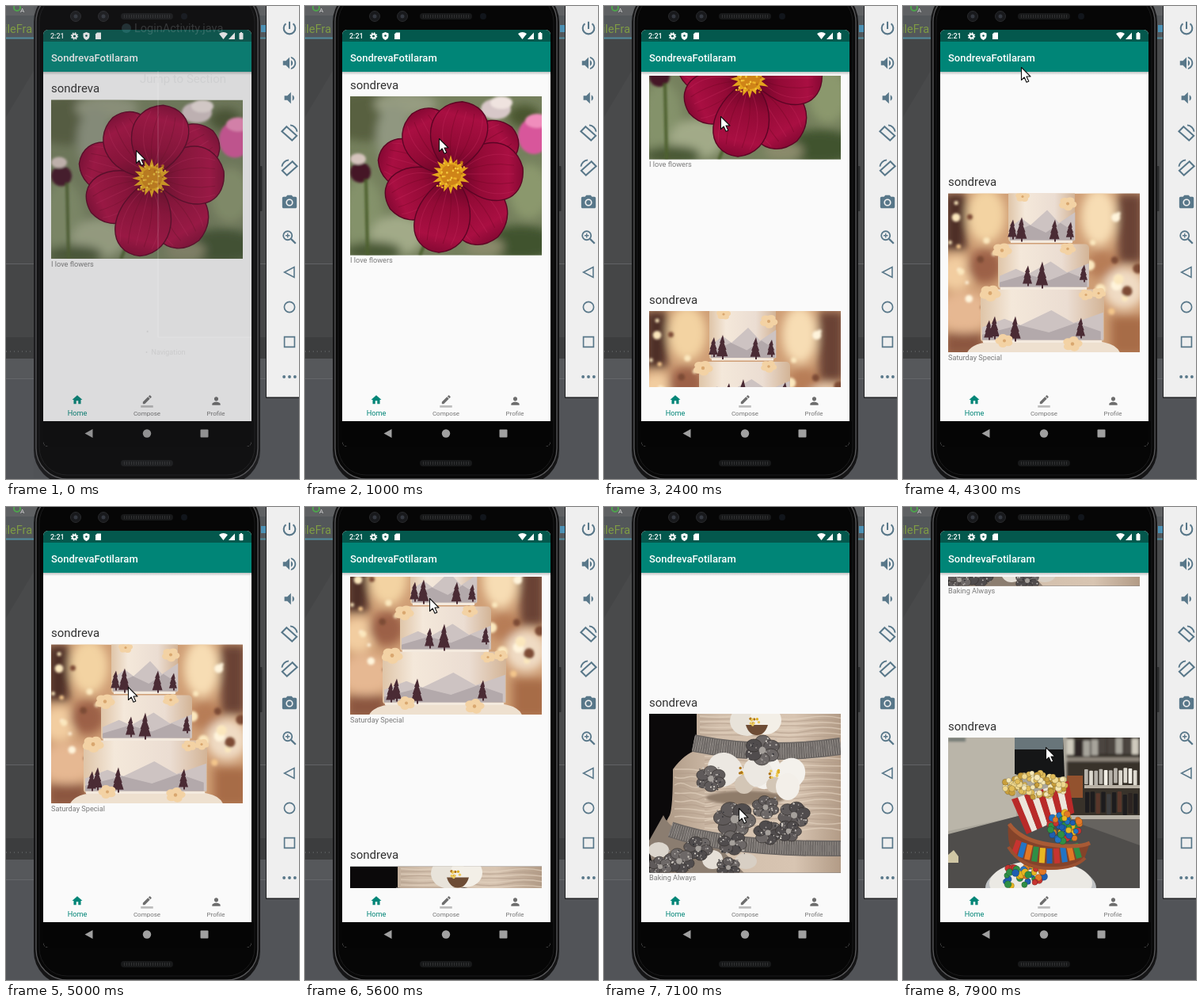
An HTML page for the animation above (8 s loop, 370 px wide and 597 px high).

```html
<!DOCTYPE html>
<html lang="en">
<head>
<meta charset="utf-8">
<title>Photo feed</title>
<style>
html, body { margin: 0; width: 100%; height: 100%; overflow: hidden; background: #515357; }
svg { display: block; }
text { font-family: Roboto, Arial, sans-serif; white-space: pre; }
</style>
</head>
<body>
<svg id="stage" width="370" height="597" viewBox="0 0 370 597"></svg>
<script>
const LOOP = 8000, STEP = 100, PITCH = 392;

let seed = 7;
const rnd = (a = 0, b = 1) => a + (b - a) * ((seed = seed * 16807 % 2147483647) / 2147483647);
const pick = list => list[Math.floor(rnd(0, list.length))];
const times = (n, fn) => Array.from({ length: n }, (_, i) => fn(i)).join('');

const rect = (x, y, w, h, fill, more = '') => `<rect x="${x}" y="${y}" width="${w}" height="${h}" fill="${fill}" ${more}/>`;
const oval = (x, y, rx, ry, fill, more = '') => `<ellipse cx="${x}" cy="${y}" rx="${rx}" ry="${ry}" fill="${fill}" ${more}/>`;
const dot = (x, y, r, fill, more) => oval(x, y, r, r, fill, more);
const path = (d, fill, more = '') => `<path d="${d}" fill="${fill}" ${more}/>`;
const line = (d, color, width, more = '') => path(d, 'none', `stroke="${color}" stroke-width="${width}" ${more}`);
const text = (x, y, size, fill, str, more = '') => `<text x="${x}" y="${y}" font-size="${size}" fill="${fill}" ${more}>${str}</text>`;
const group = (more, body) => `<g ${more}>${body}</g>`;
const blur = (n, body) => group(`filter="url(#blur${n})"`, body);
// 24-unit icon centred on a point
const icon = (x, y, size, color, body) =>
  group(`transform="translate(${x - size / 2} ${y - size / 2}) scale(${size / 24})" fill="${color}" color="${color}"`, body);
const glyph = d => `<path d="${d}"/>`;
const outline = (d, w = 2) => line(d, 'currentColor', w);

// ---------- photos, 242 x 200.5 ----------
function flower() {
  const petals = [[195, 93, 58], [-33, 97, 60], [155, 88, 62], [58, 99, 70], [0, 91, 68], [-118, 90, 62], [-76, 92, 66], [103, 100, 64]];
  const petal = ([angle, len, w]) => group(`transform="translate(127 98) rotate(${angle})"`,
    path(`M0 0C${len * .25} ${-w * .7} ${len * .85} ${-w * .8} ${len} ${-w * .12}C${len * 1.05} ${w * .55} ${len * .5} ${w * .78} 0 0Z`,
      'url(#petal)', 'stroke="#5c0424" stroke-width="1.4"') +
    times(5, i => line(`M16 ${(i - 2) * 3}Q${len * .5} ${(i - 2) * w * .24} ${len * .88} ${(i - 2) * w * .16}`, i % 2 ? '#6b0522' : '#c1285b', 1, 'opacity=".4"')));
  const rays = times(32, i => {
    const a = i * Math.PI / 16, r = i % 2 ? 15 : rnd(20, 26);
    return `${i ? 'L' : 'M'}${127 + r * Math.cos(a)} ${99 + r * Math.sin(a)}`;
  }) + 'Z';
  return rect(0, 0, 242, 201, '#75805d') +
    blur(6, oval(20, 25, 50, 32, '#59613f') + oval(70, 10, 40, 15, '#969c81') + oval(16, 150, 26, 48, '#84926a') +
      oval(60, 175, 34, 25, '#a2aa88') + oval(55, 50, 22, 40, '#909780') + oval(226, 120, 25, 35, '#8b986d') +
      oval(215, 185, 48, 22, '#40522d') + oval(30, 195, 35, 12, '#495835') + oval(220, 25, 20, 14, '#48552f') + oval(170, 190, 25, 12, '#8b8b6c')) +
    blur(2, oval(232, 50, 20, 23, '#d8579b') + oval(236, 31, 15, 9, '#f08dbc') + oval(184, 16, 19, 13, '#d7c7c8') + oval(191, 8, 14, 8, '#efe3df') +
      oval(13, 96, 13, 13, '#451725') + oval(10, 79, 10, 7, '#d5c4bd') + line('M20 105L22 201M110 150L88 201', '#4d602f', 4)) +
    petals.map(petal).join('') +
    path(rays, '#e3a51d') + dot(127, 99, 13, '#cf8418') +
    times(45, () => dot(127 + rnd(-17, 17), 99 + rnd(-17, 17), 1.3, pick(['#f5ca3d', '#f0b62b', '#bd6c13'])));
}

const blossom = (x, y, r, color, heart) => times(5, i =>
  oval(x + r * .6 * Math.cos(i * 1.257 + x), y + r * .45 * Math.sin(i * 1.257 + x), r * .55, r * .42, color)) + dot(x, y, r * .2, heart);

function weddingCake() {
  const tree = (x, y, h) => path(`M${x} ${y - h}l${h * .08} ${h * .33}h-1l${h * .1} ${h * .28}h-1l${h * .09} ${h * .27}h${-h * .46}l${h * .09} ${-h * .27}h-1l${h * .1} ${-h * .28}h-1Z`, '#4a2b34') +
    rect(x - 1, y - h * .14, 2, h * .14, '#4a2b34');
  const tier = (x, y, w, h) => rect(x, y, w, h, 'url(#icing)', 'rx="5"') +
    path(`M${x + 2} ${y + h - 3}v${-h * .24}l${w * .18} ${-h * .16} ${w * .13} ${h * .12} ${w * .25} ${-h * .28} ${w * .18} ${h * .24} ${w * .24} ${-h * .2}V${y + h - 3}Z`, '#cdc3c2') +
    path(`M${x + 2} ${y + h - 3}v${-h * .1}l${w * .3} ${-h * .18} ${w * .24} ${h * .14} ${w * .22} ${-h * .18} ${w * .2} ${h * .16}V${y + h - 3}Z`, '#b3a9ab') +
    line(`M${x + 3} ${y + h - 1}h${w - 6}`, '#f4eade', 3);
  return rect(0, 0, 242, 201, '#cf9e75') +
    blur(6, rect(-5, 0, 28, 72, '#4d2f28') + oval(48, 28, 24, 34, '#f3d3a2') + oval(10, 100, 22, 22, '#f2cda0') + oval(46, 92, 22, 22, '#9c6047') +
      oval(20, 150, 32, 26, '#e6b892') + oval(190, 30, 22, 36, '#f7ddb4') + rect(214, 0, 32, 88, '#6a4334') +
      oval(195, 90, 20, 18, '#b77d57') + oval(222, 120, 26, 26, '#f0dcc4') + rect(205, 155, 45, 50, '#a76c47') + rect(-5, 176, 50, 30, '#8c5640')) +
    blur(2, times(26, i => dot(i % 2 ? rnd(2, 62) : rnd(178, 240), rnd(0, 150), rnd(2, 7), pick(['#fbe7bd', '#fff4dc', '#f3c58b', '#7d4b36'])))) +
    path('M24 201Q30 188 60 187H190Q212 189 217 201Z', '#eee0cf') + tier(41, 121, 156, 67) + tier(63, 64, 115, 57) + tier(76, -6, 84, 68) +
    [[82, 58, 25], [93, 61, 31], [135, 61, 28], [155, 58, 22], [101, 117, 26], [119, 120, 34], [172, 112, 22], [52, 185, 25], [59, 184, 29], [85, 187, 32], [168, 183, 26]].map(t => tree(...t)).join('') +
    [[94, 4, 8], [151, 13, 10], [68, 72, 11], [151, 70, 9], [53, 126, 12], [174, 128, 8], [190, 126, 8], [71, 186, 10], [157, 190, 11]].map(([x, y, r]) => blossom(x, y, r, '#f3d2a4', '#d9a76f')).join('');
}

function orchidCake() {
  const brooch = (x, y, r) => times(6, i => {
    const a = i * Math.PI / 3 + x;
    return oval(x + r * .58 * Math.cos(a), y + r * .5 * Math.sin(a), r * .45, r * .36, pick(['#5f5a5a', '#6d6867', '#504c4d']), 'stroke="#35312f" stroke-width=".7"');
  }) + times(34, () => dot(x + rnd(-r, r) * .85, y + rnd(-r, r) * .75, rnd(.5, 1.2), pick(['#b5b0ad', '#37363a', '#8b8582', '#d5d0c8']))) + dot(x, y, r * .2, '#a5a09b');
  const heart = (x, y) => times(10, () => dot(x + rnd(-6, 6), y + rnd(-5, 5), 1.7, pick(['#dfaf21', '#ad7319', '#ecc95a'])));
  const orchid = (x, y, r) => path(`M${x} ${y}C${x - r * .3} ${y - r} ${x - r * 1.4} ${y - r * .6} ${x - r * 1.1} ${y + r * .1}Q${x - r * .7} ${y + r * .9} ${x} ${y}Z`, '#ece8e2') +
    path(`M${x} ${y}C${x + r * .3} ${y - r} ${x + r * 1.4} ${y - r * .6} ${x + r * 1.1} ${y + r * .2}Q${x + r * .6} ${y + r} ${x} ${y}Z`, '#f4f1ec') +
    oval(x, y + r * .4, r * .3, r * .3, '#d3c6b6') + heart(x, y);
  const ribbon = (d, w) => line(d, '#6a6562', w) + line(d, '#98928d', w - 3, 'stroke-dasharray="1 2"') + line(d, '#7a7572', w * .4, 'stroke-dasharray="1 1.5"');
  const swirls = (x, y, w, n, gap) => times(n, i => line(`M${x} ${y + i * gap}q${w * .12} ${rnd(-7, 3)} ${w * .25} 0t${w * .25} 2 ${w * .25} 0 ${w * .25} 1`, i % 2 ? '#b39d8a' : '#e6d5c3', 1.4, 'opacity=".6"'));
  return rect(0, 0, 242, 201, '#0b090a') +
    path('M60 0H242V201H8Q12 150 26 128Q30 118 30 70Q45 50 60 46Z', 'url(#cream)') +
    swirls(64, 3, 180, 8, 3.4) + swirls(70, 54, 172, 21, 4.5) + swirls(32, 70, 65, 14, 5) +
    path('M18 128Q26 150 90 170L120 201H12Q0 190 0 160Z', '#8b7d70') + blur(2, oval(122, 106, 50, 9, '#8f7c6a')) +
    ribbon('M56 37Q145 55 242 41', 22) + ribbon('M27 146Q100 171 242 170', 20) +
    oval(124, 9, 22, 19, '#e8e3da') + oval(147, 8, 20, 18, '#f3efe7') + path('M122 14H150Q146 27 136 27T122 14Z', '#6d4c35') + heart(134, 10) +
    orchid(120, 73, 40) + orchid(158, 76, 34) + oval(175, 92, 15, 17, '#f3efe9') +
    oval(12, 172, 13, 10, '#dcd6cd') + oval(80, 184, 13, 12, '#e5dfd7') + oval(122, 186, 14, 10, '#d8cfc4') +
    [[78, 82, 19], [143, 46, 22], [108, 133, 26], [147, 118, 17], [183, 128, 20], [150, 150, 18], [105, 163, 18], [176, 148, 16], [62, 170, 18], [38, 186, 19], [14, 193, 15], [100, 194, 15]].map(b => brooch(...b)).join('');
}

function popcornCake() {
  const candy = ['#c73430', '#1f5fb0', '#e8b622', '#2f8f45', '#e27825', '#2374c4'];
  const balls = (n, x, y, w, h, colors, r) => times(n, () => {
    const a = rnd(0, 6.283), k = Math.sqrt(rnd());
    return dot(x + w * k * Math.cos(a), y + h * k * Math.sin(a), r * rnd(.8, 1.2), pick(colors), 'stroke="#0004" stroke-width=".7"');
  });
  const bottles = (x, y, w, h, n, colors) => times(n, i => rect(x + i * w / n, y + rnd(0, 4), w / n - 1.5, h, pick(colors), 'rx="1"'));
  const side = i => [80 + i * 8, 78 - i * 2.6, 99 + i * 6.7, 122 - i * 3];
  const stripe = i => {
    const [a, b, c, d] = side(i), [e, f, g, h] = side(i + 1);
    return path(`M${a} ${b}L${e} ${f}L${g} ${h}L${c} ${d}Z`, i % 2 ? '#ede5db' : '#b92a29');
  };
  return rect(0, 0, 242, 201, '#aaa69b') + path('M0 0H86V100L0 118Z', '#bab5a9') +
    blur(2, rect(0, 0, 22, 5, '#747a76') + rect(150, -3, 95, 105, '#37302c') +
      bottles(150, 0, 92, 20, 9, ['#cfcabd', '#a7a49b', '#4b4540', '#2d2826']) + rect(150, 25, 92, 5, '#8d857a')) +
    bottles(172, 38, 68, 19, 11, ['#f1eee5', '#dedad0', '#b7b3ab']) + rect(150, 48, 20, 28, '#93522e') + rect(172, 60, 70, 4, '#b8b1a5') +
    bottles(173, 68, 68, 26, 10, ['#1d1c1e', '#2c2422', '#59372b', '#3d3e40']) + rect(148, 98, 94, 5, '#b9b4a9') +
    path('M0 122L92 98 150 103H242V201H0Z', '#4f4d4b') + path('M150 103H242V136Z', '#66635f') +
    path('M0 148l7 -6 6 8v8H0Z', '#d0c7a5') +
    oval(117, 190, 70, 32, '#bfc2c4') + oval(117, 184, 65, 29, '#ebe9e4') +
    path('M84 0H145L147 49Q118 56 84 46Z', '#151617') + rect(84, 0, 61, 15, '#68757a') +
    times(9, stripe) +
    balls(95, 110, 60, 40, 16, ['#f0d98f', '#f6e8b5', '#c99f3c', '#e0bb58'], 3.6) +
    balls(42, 93, 174, 29, 15, candy, 4) +
    path('M76 108Q92 130 128 135T179 133L172 153Q142 174 102 163Q72 152 76 108Z', '#84432a') +
    times(10, i => rect(82 + i * 8.5, 129 + 11 * Math.sin(i * .3), 7, 19, candy[i * 5 % 6], `transform="rotate(${20 - i * 4} ${85 + i * 8.5} 140)"`)) +
    line('M77 109Q92 130 128 135T179 133', '#a85a35', 5) + line('M76 138Q92 164 126 165T173 152', '#9a5030', 4) +
    balls(65, 147, 113, 20, 18, candy, 4);
}

// ---------- screen ----------
const posts = [['I love flowers', flower], ['Saturday Special', weddingCake], ['Baking Always', orchidCake], ['', popcornCake]];
const feed = posts.map(([caption, photo], i) => group(`transform="translate(57 ${i * PITCH})"`,
  text(0, 109, 15, '#303030', 'sondreva') +
  `<svg y="118.5" width="242" height="200.5">${photo()}</svg>` +
  text(0, 328.6, 9.2, '#7b7b7b', caption))).join('');

const HOME = 'M10 20v-6h4v6h5v-8h3L12 3 2 12h3v8z';
const PEN = 'M17.75 7L14 3.25l-10 10V17h3.75l10-10zm2.96-2.96c.39-.39.39-1.02 0-1.41L18.37.29c-.39-.39-1.02-.39-1.41 0L15 2.25 18.75 6l1.96-1.96z';
const PERSON = 'M12 12c2.21 0 4-1.79 4-4s-1.79-4-4-4-4 1.79-4 4 1.79 4 4 4zm0 2c-2.67 0-8 1.34-8 4v2h16v-2c0-2.66-5.33-4-8-4z';
const middle = 'text-anchor="middle"';

const screen = rect(47, 30, 263, 526, '#fafafa') +
  group('clip-path="url(#list)"', `<g id="feed">${feed}</g>`) +
  rect(47, 83, 263, 4, 'url(#shade)') +
  rect(47, 30, 263, 16, '#04584d') + rect(47, 45, 263, 38, '#008577') +
  text(57, 70, 13, '#fff', 'SondrevaFotilaram', 'font-weight="500"') +
  text(56, 41, 9, '#fff', '2:21', 'font-weight="500"') +
  dot(86.5, 38, 2.6, 'none', 'stroke="#fff" stroke-width="2"') + dot(86.5, 38, 4, 'none', 'stroke="#fff" stroke-width="1.4" stroke-dasharray="1.6 1.54"') +
  path('M101.5 33l4 1.5v3q0 4-4 5.5-4-1.5-4-5.5v-3Z', '#fff') + dot(101.5, 37.5, 1.3, '#04584d') +
  path('M115 33.5h5v8.5h-7v-6.5Z', '#fff') +
  path('M269 35q5.5-4 11 0l-5.5 7Z', '#fff') + path('M289 33.5V42h-8Z', '#fff') + rect(294.5, 34, 5, 8.2, '#fff', 'rx=".8"') + rect(296, 33, 2, 2, '#fff') +
  rect(47, 481, 263, 43, '#fafafa') +
  icon(90, 497, 15.5, '#008577', glyph(HOME)) +
  icon(178, 499, 15.5, '#6d6d6d', glyph(PEN) + rect(0, 20, 24, 4, '#b9b9b9')) +
  icon(265.5, 498.5, 15.5, '#6d6d6d', glyph(PERSON)) +
  text(90, 516.5, 9.2, '#008577', 'Home', middle) + text(178, 516.5, 8, '#757575', 'Compose', middle) + text(265, 516.5, 8, '#757575', 'Profile', middle) +
  rect(47, 524, 263, 32, '#050505') +
  path('M99.5 539.5l10-5.5v11Z', '#a0a0a0') + dot(178, 539.5, 5.2, '#a0a0a0') + rect(245.5, 534.5, 10, 10, '#a0a0a0', 'rx="1"');

// ---------- surroundings ----------
const desktop = rect(0, 0, 370, 597, '#525458') + rect(0, 0, 370, 12, '#5f6163') + rect(0, 12, 370, 28, '#53575a') +
  dot(14, 2, 4, 'none', 'stroke="#4ea44d" stroke-width="2"') + text(18, 8, 8, '#d5d5d5', 'A') +
  text(-2, 34, 14.5, '#7e9b45', 'ileFra') + rect(0, 39.5, 328, 2, '#50899a') +
  rect(0, 42, 328, 283, '#494a4b') + path('M0 42H36V80L0 140Z', '#444546') + rect(0, 325, 328, 1, '#626365') + rect(0, 326, 328, 92, '#454647') +
  rect(0, 418, 328, 27, '#3c3d3e') + line('M0 436H34', '#57595a', 2, 'stroke-dasharray="1 4"') + rect(0, 445, 370, 25, '#56585b') + rect(0, 470, 370, 1, '#646669') +
  rect(322, 24, 6, 9, '#4b90b4');

const phone = rect(320, 202, 3.5, 57, '#2a2b2c', 'rx="1"') +
  rect(35, -22, 286, 625, '#151516', 'rx="42"') + rect(38, -19, 280, 616, '#070707', 'rx="39" stroke="#58585a" stroke-width="1.3"') +
  rect(42, -15, 272, 607, '#060606', 'rx="35" stroke="#1b1b1c"') +
  [88, 123].map(x => dot(x, 13, 6.5, '#18191c', 'stroke="#292a2c"') + dot(x, 13, 2.5, '#343840')).join('') + dot(225, 13, 4, '#11151b') +
  [13, 577].map(y => rect(145, y - 4, 66, 8, '#18191a', 'rx="4"') + line(`M149 ${y}H208`, '#303132', 4, 'stroke-dasharray="1 2"')).join('') +
  group('clip-path="url(#glass)"', screen);

const ghost = `<g id="ghost">${rect(35, 0, 286, 596, '#484b50', 'opacity=".17"')}${
  group('opacity=".2"', dot(152, 28, 6, '#6db0c0') + text(162, 33, 14.5, '#c8d0d4', 'LoginActivity.java') + text(169, 97, 15, '#9da1a5', 'Jump to Section') +
    line('M192 82V418H310', '#fff', 1) + rect(193, 83, 117, 335, '#777', 'opacity=".1"') + text(176, 440, 9, '#888', '•  Navigation') + text(177, 415, 10, '#888', '•'))}</g>`;

const VOLUME = 'M3 9v6h4l5 5V4L7 9H3zm13.5 3c0-1.77-1.02-3.29-2.5-4.03v8.05c1.48-.73 2.5-2.25 2.5-4.02z';
const rotate = outline('M8 3.5L22 16 15.5 22.5 1.5 10Z', 2.2) + outline('M13 1.5a10.5 10.5 0 0 1 9.5 9', 2);
const tools = [
  outline('M12 3V13M7 5.8a8 8 0 1 0 10 0', 2.2),
  glyph(VOLUME + 'M14 3.23v2.06c2.89.86 5 3.54 5 6.71s-2.11 5.85-5 6.71v2.06c4.01-.91 7-4.49 7-8.77s-2.99-7.86-7-8.77z'),
  group('transform="translate(2)"', glyph(VOLUME)),
  rotate,
  group('transform="translate(24) scale(-1 1)"', rotate),
  glyph('M9 2L7.17 4H4c-1.1 0-2 .9-2 2v12c0 1.1.9 2 2 2h16c1.1 0 2-.9 2-2V6c0-1.1-.9-2-2-2h-3.17L15 2H9zm3 15c-2.76 0-5-2.24-5-5s2.24-5 5-5 5 2.24 5 5-2.24 5-5 5z') + dot(12, 12, 3.2, 'currentColor'),
  dot(9.5, 9.5, 6, 'none', 'stroke="currentColor" stroke-width="2"') + outline('M14 14l6.5 6.5', 2.5) + outline('M6.5 9.5h6M9.5 6.5v6', 1.5),
  outline('M18.5 5v14L5 12Z', 1.7),
  dot(12, 12, 7.2, 'none', 'stroke="currentColor" stroke-width="1.8"'),
  outline('M5 5h14v14h-14Z', 1.8),
  [4.5, 12, 19.5].map(x => dot(x, 12, 2.1, 'currentColor')).join('')
];
const toolbar = rect(328, 0, 42, 495, '#202123') + rect(329, 0, 41, 493.5, '#efefef') +
  tools.map((body, i) => icon(358, 28 + i * 44, 22, '#587789', body)).join('');

const pointer = `<g id="pointer">${path('M.5.5V16.5L4.2 13 7 19.3 9.8 18 7 12H12Z', '#fff', 'stroke="#111" stroke-width="1.1" stroke-linejoin="round"')}</g>`;

const stops = (...list) => list.map(([at, color]) => `<stop offset="${at}" stop-color="${color}"/>`).join('');
const defs = `<defs>
  ${[2, 6].map(n => `<filter id="blur${n}" x="-20%" y="-20%" width="140%" height="140%"><feGaussianBlur stdDeviation="${n === 2 ? 1.5 : 6}"/></filter>`).join('')}
  <linearGradient id="petal">${stops([0, '#5f0322'], [.4, '#930a36'], [.8, '#a90f42'], [1, '#860833'])}</linearGradient>
  <linearGradient id="icing">${stops([0, '#dfc5a8'], [.25, '#f4e8da'], [.7, '#ebddd2'], [1, '#d3b496'])}</linearGradient>
  <linearGradient id="cream">${stops([0, '#a8937f'], [.35, '#d2bfac'], [.75, '#d8c5b2'], [1, '#b29b86'])}</linearGradient>
  <linearGradient id="shade" x2="0" y2="1">${stops([0, '#bcc0c0'], [1, '#fafafa'])}</linearGradient>
  <clipPath id="list"><rect x="47" y="88" width="263" height="393"/></clipPath>
  <clipPath id="glass"><rect x="47" y="30" width="263" height="526" rx="6"/></clipPath>
</defs>`;

const $ = id => document.getElementById(id);
$('stage').innerHTML = defs + desktop + phone + ghost + toolbar + pointer;

// ---------- motion: [start, end, scroll, pointer x, pointer y] ----------
const START = [0, 164, 182];
const moves = [
  [600, 1000, 4.5, 169, 167], [1000, 1500, 91, 160, 80],
  [1700, 2000, 122, 152, 52], [2000, 2400, 125.5, 147, 139],
  [2800, 3100, 125.5, 134, 237], [3300, 3400, 272, 149, 77],
  [4200, 4300, 274, 149, 77], [4300, 4500, 274, 152, 400], [4600, 4700, 274, 149, 335],
  [4800, 5000, 337, 154, 227], [5100, 5200, 420, 156, 144], [5400, 5600, 449, 157, 115],
  [5700, 5800, 487, 158, 77], [6100, 6200, 600, 160, 120],
  [6600, 6700, 641.5, 165, -40], [6700, 6800, 641.5, 165, 5], [6800, 7100, 641.5, 170, 380],
  [7200, 7500, 890, 168, 140], [7500, 7700, 1003.5, 158, 420], [7800, 7900, 1003.5, 180, 303]
];

function stateAt(t) {
  let state = START;
  for (const [from, to, ...goal] of moves) {
    if (t <= from) break;
    const k = Math.min(1, (t - from) / (to - from));
    state = state.map((v, i) => v + (goal[i] - v) * k);
  }
  return state;
}

function draw(now) {
  const t = Math.floor(now % LOOP / STEP) * STEP;
  const [scroll, x, y] = stateAt(t);
  $('feed').setAttribute('transform', `translate(0 ${-scroll})`);
  $('pointer').setAttribute('transform', `translate(${x} ${y})`);
  $('ghost').setAttribute('opacity', Math.max(0, Math.min(1, (500 - t) / 300)));
}

const origin = performance.now();
function tick() {
  draw(performance.now() - origin);
  requestAnimationFrame(tick);
}
tick();
</script>
</body>
</html>
```
